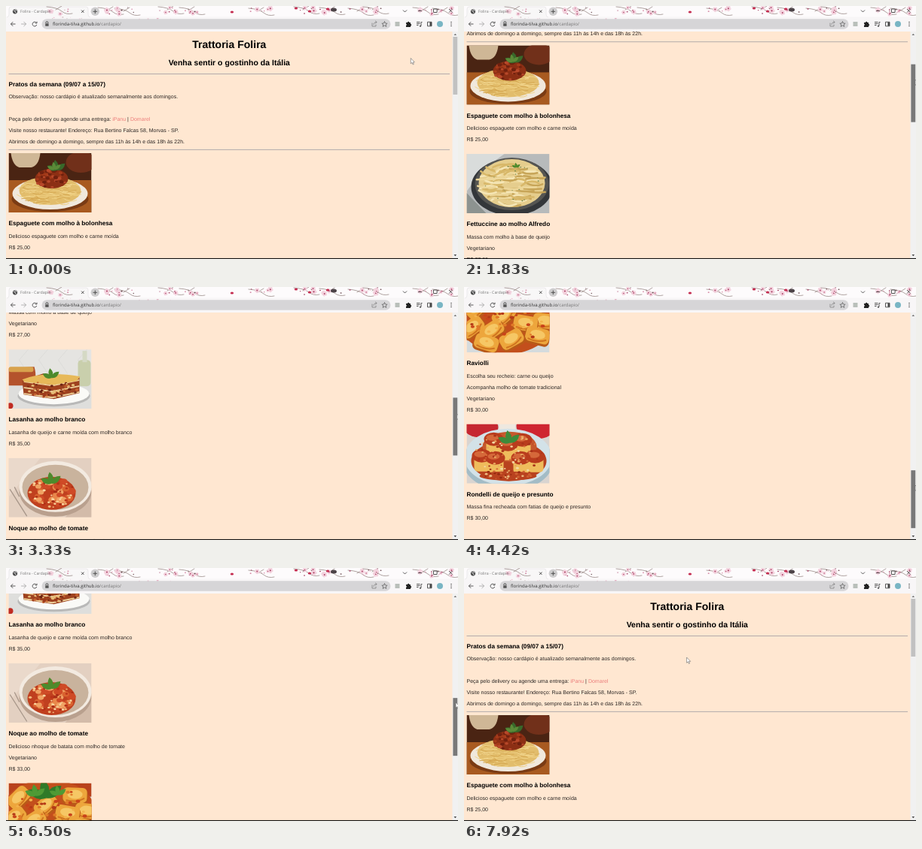
An HTML page for the animation above (8 s loop, 600 by 337 pixels).

```html
<!DOCTYPE html>
<html lang="pt-BR">
<head>
<meta charset="utf-8">
<title>Cardapio</title>
<style>
html, body { margin: 0; width: 100%; height: 100%; overflow: hidden; background: #ffe7d1; }
svg { display: block; }
#stage { width: 100vw; height: 100vh; }
text { font-family: "Liberation Sans", Arial, sans-serif; text-rendering: geometricPrecision; white-space: pre; }
.ui { font-family: "Open Sans", sans-serif; }
.line { fill: none; stroke: #444; stroke-width: .9; }
.link { fill: #ec7f7c; }
</style>
</head>
<body>
<svg id="stage" viewBox="0 0 600 337" preserveAspectRatio="none"></svg>
<script>
let seed = 11;
const rnd = () => (seed = seed * 16807 % 2147483647) / 2147483647;
const pick = list => list[Math.floor(rnd() * list.length)];
const times = (n, fn) => Array.from({ length: n }, (_, i) => fn(i)).join('');

const rect = (x, y, w, h, fill, more = '') =>
  `<rect x="${x}" y="${y}" width="${w}" height="${h}" fill="${fill}" ${more}/>`;
const oval = (x, y, rx, ry, fill, more = '') =>
  `<ellipse cx="${x}" cy="${y}" rx="${rx}" ry="${ry}" fill="${fill}" ${more}/>`;
const path = (d, fill, more = '') => `<path d="${d}" fill="${fill}" ${more}/>`;
const stroke = (d, color, width = .8) =>
  path(d, 'none', `stroke="${color}" stroke-width="${width}" stroke-linecap="round"`);
const text = (x, y, size, str, more = '') =>
  `<text x="${x}" y="${y + size * .358}" font-size="${size}" ${more}>${str}</text>`;

// A random point inside an ellipse
function inside(x, y, rx, ry) {
  const a = rnd() * 6.283, r = Math.sqrt(rnd());
  return [x + Math.cos(a) * r * rx, y + Math.sin(a) * r * ry];
}
const blobs = (n, area, size, colors) => times(n, () => {
  const [x, y] = inside(...area), r = size * (.6 + rnd() * .6);
  return oval(x, y, r, r * .75, pick(colors));
});
const strands = (n, area, len, colors, width) => times(n, () => {
  const [x, y] = inside(...area), bend = (rnd() - .5) * len;
  return stroke(`M${x - len / 2} ${y}q${len / 2} ${bend} ${len} ${bend / 3}`, pick(colors), width);
});
const leaves = (x, y, size, color = '#4d8a2c') => [-65, -10, 50].map(a =>
  `<g transform="translate(${x} ${y}) rotate(${a})">` +
  path(`M0 0Q${-size * .6} ${-size * .6} 0 ${-size * 1.3}Q${size * .6} ${-size * .6} 0 0`, color) + '</g>').join('');

const photos = [
  // spaghetti
  () => rect(0, 0, 110, 79, '#4a2413') + rect(0, 36, 110, 43, '#a85a20') +
    path('M3 0H42Q40 17 30 19H14Q5 16 3 0', '#cfb796') + oval(96, 12, 20, 14, '#71301a') +
    oval(55, 61, 51, 17, '#7a3b14') + oval(55, 54, 50, 21, '#f0e8dc') +
    oval(55, 50, 41, 19, '#e2bd6c') +
    strands(70, [55, 52, 37, 16], 17, ['#f2d68e', '#d5a750', '#efcf80'], 1) +
    oval(57, 34, 22, 13, '#8c2f14') + blobs(45, [57, 34, 21, 12], 2.6, ['#6f200e', '#a63b1a', '#b8482a']) +
    leaves(64, 23, 11, '#38682a') + leaves(61, 22, 8, '#5b8a38'),
  // fettuccine
  () => rect(0, 0, 110, 79, '#b7babb') + path('M0 0H50L20 22L0 50', '#d9dcdb') +
    path('M0 52L26 79H0', '#8d9390') + oval(60, 44, 54, 38, '#34373a') + oval(60, 40, 49, 35, '#555552') +
    oval(60, 39, 44, 32, '#e5cd8d') +
    strands(75, [60, 39, 37, 28], 23, ['#f5e6b6', '#d8b869', '#edd79a', '#c7a558'], 2.5) +
    blobs(22, [60, 38, 38, 27], 1, ['#658044', '#87935a']) + leaves(66, 18, 5),
  // lasagna
  () => rect(0, 0, 110, 79, '#e5e4e1') +
    times(5, i => stroke(`M${i * 26} 0l-12 14 12 18`, '#d5d5d2', .6)) + rect(0, 46, 110, 33, '#dededc') +
    rect(92, 14, 17, 35, '#c9cfac', 'rx="5"') + rect(98, 2, 6, 15, '#d5d9c5') +
    path('M0 25L34 23Q39 40 30 48H0', '#b4532c') + rect(0, 23, 33, 7, '#d8a24d', 'rx="3"') +
    oval(2, 75, 4, 4, '#c02b22') +
    oval(60, 62, 48, 14, '#b9b9b8') + oval(60, 59, 47, 14, '#fafaf7') +
    path('M18 41L46 32L94 37L94 58L60 66L20 60', '#9e421f') +
    [43, 51, 59].map(y => stroke(`M21 ${y}l37 5 35 -7`, '#edd09a', 2)).join('') +
    path('M18 40Q48 28 95 36L90 42L59 47L21 43', '#e7b959') +
    blobs(70, [57, 53, 36, 11], 1.9, ['#6d2413', '#9c3a1b', '#c76431', '#e7bd78']) + leaves(57, 38, 10),
  // gnocchi
  () => rect(0, 0, 110, 79, '#e3d0c1') + path('M0 0H42L0 52', '#ead9cb') + path('M75 79L110 43V79', '#d3bba9') +
    oval(62, 44, 48, 34, '#b9a08e') + oval(62, 38, 48, 34, '#f3eae0') + oval(62, 39, 44, 30, '#c9b39d') +
    oval(57, 47, 32, 22, '#c0401f') +
    blobs(30, [57, 46, 28, 19], 5.5, ['#e8874a', '#cf4a26', '#f0a263', '#d9632f']) +
    blobs(45, [57, 46, 30, 20], 1.9, ['#f9d39c', '#a82c15', '#f2b87a', '#bb3218']) + leaves(57, 34, 12) +
    stroke('M2 42L24 77M8 39L14 51', '#a9988b', 1.4),
  // ravioli
  () => rect(0, 0, 110, 79, '#d5dbdd') + rect(0, 0, 110, 18, '#b9421c') + oval(53, 38, 62, 43, '#c34f1c') +
    [[14, 20], [88, 17], [50, 30], [104, 38], [8, 46], [78, 41], [34, 50], [94, 57], [60, 62], [26, 67]].map(([x, y], i) =>
      `<g transform="translate(${x} ${y}) rotate(${i * 47 % 90 - 45})">` +
      rect(-17, -10, 34, 22, '#b95a18', 'rx="6"') + rect(-16, -11, 32, 20, '#eda63c', 'rx="6"') +
      oval(0, -2, 10, 6, '#f6c765') + stroke('M-11 6Q2 9 12 3', '#d0741f', 2) + '</g>').join('') +
    blobs(45, [53, 38, 52, 34], 2.4, ['#c9431a', '#e07a28', '#b53a17', '#f3b24c']) +
    leaves(50, 20, 20, '#2f7a28') + leaves(36, 17, 12, '#4f9a35') + leaves(66, 16, 10, '#4f9a35'),
  // rondelli
  () => rect(0, 0, 110, 79, '#d9d4d0') + oval(19, 4, 23, 14, '#c62730') + oval(92, 3, 26, 17, '#cf2530') +
    rect(43, 0, 22, 12, '#eee8df') + oval(55, 49, 60, 40, '#a3bcc6') + oval(55, 44, 58, 38, '#d3e2e8') +
    oval(56, 49, 50, 27, '#b8421f') + oval(57, 30, 36, 20, '#c6582c') +
    [[36, 20], [74, 21], [55, 27], [20, 42], [91, 43], [38, 45], [72, 45]].map(([x, y]) =>
      rect(x - 10, y - 1, 21, 22, '#efbc5c', 'rx="5"') + oval(x, y, 13, 9, '#b93c1d') +
      oval(x - 2, y - 2, 8, 4, '#d5683a')).join('') +
    blobs(85, [56, 40, 44, 27], 1.7, ['#f3d9a4', '#d86e3a', '#a93319', '#e9a860']) +
    oval(55, 69, 38, 6, '#b9421f') + blobs(30, [53, 68, 36, 6], 1.7, ['#edbd82', '#cf6131', '#96290f']) +
    leaves(57, 25, 13, '#3f8a3a')
];

const dishes = [
  ['Espaguete com molho à bolonhesa', 'Delicioso espaguete com molho e carne moída', 'R$ 25,00'],
  ['Fettuccine ao molho Alfredo', 'Massa com molho à base de queijo', 'Vegetariano', 'R$ 27,00'],
  ['Lasanha ao molho branco', 'Lasanha de queijo e carne moída com molho branco', 'R$ 35,00'],
  ['Noque ao molho de tomate', 'Delicioso nhoque de batata com molho de tomate', 'Vegetariano', 'R$ 33,00'],
  ['Raviolli', 'Escolha seu recheio: carne ou queijo', 'Acompanha molho de tomate tradicional', 'Vegetariano', 'R$ 30,00'],
  ['Rondelli de queijo e presunto', 'Massa fina recheada com fatias de queijo e presunto', 'R$ 30,00']
];

const LEFT = 3.5, STEP = 14.9;
const para = (y, str) => text(LEFT, y, 7.02, str, 'fill="#2b2724"');
const title = (y, size, str) => text(296.3, y, size, str, 'font-weight="bold" text-anchor="middle"');
const sub = (y, str) => text(LEFT, y, 8.22, str, 'font-weight="bold"');
const link = str => `<tspan class="link">${str}</tspan>`;
const rule = y => rect(LEFT, y - .4, 585.5, .9, '#aaa5a7');

function menu() {
  let y = 196;
  return dishes.map(([name, ...lines], i) => {
    const top = y;
    y += 110.5 + STEP * (lines.length - 1) + 19.3;
    return `<svg x="${LEFT}" y="${top}" width="110" height="79">${photos[i]()}</svg>` +
      sub(top + 93.2, name) + lines.map((l, k) => para(top + 110.3 + k * STEP, l)).join('');
  }).join('');
}

const page = () =>
  title(51, 14.04, 'Trattoria Folira') + title(75, 10.53, 'Venha sentir o gostinho da Itália') +
  rule(90.5) + sub(104, 'Pratos da semana (09/07 a 15/07)') +
  para(120.5, 'Observação: nosso cardápio é atualizado semanalmente aos domingos.') +
  para(150.3, `Peça pelo delivery ou agende uma entrega: ${link('iPanu')} | ${link('Domarel')}`) +
  para(165.2, 'Visite nosso restaurante! Endereço: Rua Bertino Falcas 58, Morvas - SP.') +
  para(180.1, 'Abrimos de domingo a domingo, sempre das 11h às 14h e das 18h às 22h.') +
  rule(191.3) + menu() +
  para(1142.3, 'Dúvidas? Sugestões? Entre em contato!') +
  para(1157.2, `${link('PapoNuvo')} | ${link('Turmanex')} | ${link('Retratano')}`);

const flower = (x, y, r) => times(5, i => {
  const a = i * 1.257 + x;
  return oval(x + Math.cos(a) * r, y + Math.sin(a) * r, r * .8, r * .8, '#f3d3de');
}) + oval(x, y, r * .5, r * .5, '#b0486c');

// Sprigs of cherry blossom: a twig, pale flowers, buds and a few dark petals
const blossoms = () => [70, 138, 160, 218, 246, 338, 398, 432, 470, 490, 556, 582].map((x, i) =>
  stroke(`M${x - 16} ${1 + i % 3}q14 1 20 6t14 3m-22 -5l8 -5`, '#8d7b78', .7) +
  times(3, () => flower(x + rnd() * 26 - 13, 2 + rnd() * 9, 1.3 + rnd())) +
  blobs(4, [x, 6, 16, 5], 1, ['#6b4a50', '#d58aa5', '#a8476a'])).join('') +
  [[300, 8], [385, 3], [403, 7], [427, 4]].map(([x, y]) => oval(x, y, 2.2, 1.6, '#c42c50')).join('') +
  oval(435, 5, 4, 2.5, '#4d4448') +
  blobs(16, [200, 18, 24, 5], 1, ['#edc3d3', '#e3a9bf']) + blobs(16, [80, 18, 25, 4], .9, ['#c9b5b5', '#edc3d3']);

const line = d => `<path class="line" d="${d}"/>`;
const chrome = () =>
  rect(0, 0, 600, 15, '#fdfbfc') + rect(0, 14.5, 600, 19.5, '#f8f6f7') +
  path('M1 15Q4 15 4 11V4Q4 1 7 1H106Q109 1 109 4V11Q109 15 112 15', '#f8f7f7', 'stroke="#dddadd" stroke-width=".5"') +
  blossoms() +
  oval(12, 7.3, 3.1, 3.1, '#4b4b4b') + stroke('M10 6l2 1 1 2M12 5l2 1', '#fff', .8) +
  text(19, 7.3, 5.3, 'Folira - Cardapio', 'class="ui" fill="#777"') +
  line('M100 5.5l3.5 3.5m0-3.5l-3.5 3.5') +
  oval(118.3, 7.3, 5.7, 5.7, '#cecdce') + line('M115.5 7.3h5.6m-2.8-2.8v5.6') +
  line('M527 5.5l2.5 2.5 2.5-2.5M547 6.5h5M567.5 4h4.6v4.6h-4.6zM588 4l4.6 4.6m0-4.6l-4.6 4.6') +
  rect(47.5, 17.2, 463, 13.6, '#d6d5d7', 'rx="6.8"') +
  line('M12.5 24H6.5m2.7-2.8L6.4 24l2.8 2.8') +
  stroke('M20.5 24h6m-2.7-2.8l2.8 2.8-2.8 2.8', '#aaa', .9) +
  line('M40.4 22.4a2.9 2.9 0 1 0 .4 2.6M41 20.7v2.2h-2.3') +
  rect(52.2, 23.2, 4.4, 3.5, '#555', 'rx=".5"') + line('M53 23v-1a1.4 1.4 0 0 1 2.8 0v1') +
  text(62, 24.1, 6.05, 'florinda-tilva.github.io<tspan fill="#777">/cardapio/</tspan>', 'class="ui" fill="#333"') +
  stroke('M486 23v4h5v-2m-3-.5q0-3 4-3m-1.5-1.5l1.6 1.5-1.6 1.5', '#777', .7) +
  path('M502.5 20.5l1 2.5 2.6 .2-2 1.7 .7 2.5-2.3-1.4-2.3 1.4 .7-2.5-2-1.7 2.6-.2z', 'none', 'stroke="#555" stroke-width=".7"') +
  rect(516.5, 21, 6, 6, '#b9bfba') +
  path('M531 22h2a1.2 1.2 0 0 1 2.4 0h1.6v2a1.2 1.2 0 0 1 0 2.4v1.6h-6v-2a1.3 1.3 0 0 0 0-2.4z', '#222') +
  line('M545 21.5h4.5m-4.5 2h4.5m-4.5 2h2.5m3.5 1v-5h1.5') + oval(550, 26.7, 1.1, 1, '#444') +
  line('M559.5 21.3h5.5v5.5h-5.5z') + rect(562.5, 21.5, 2.5, 5, '#444') +
  oval(576, 24, 4, 4, '#79b5c4') +
  [21.5, 24, 26.5].map(y => oval(591, y, .75, .75, '#444')).join('');

const stage = document.getElementById('stage');
stage.innerHTML =
  rect(0, 0, 600, 337, '#ffe7d1') +
  `<svg y="34" width="600" height="302" viewBox="0 34 600 302"><g id="page">${page()}</g></svg>` +
  chrome() +
  rect(592.5, 34, 7.5, 302, '#f1f1f1') +
  path('M594.5 39l1.8-2.2 1.8 2.2z', '#777') + path('M594.5 331l1.8 2.2 1.8-2.2z', '#444') +
  rect(593.4, 41, 5.8, 77, '#c1c1c1', 'id="thumb"') +
  rect(0, 335.9, 600, 1.1, '#151515') +
  path('M0 0V7.3L1.7 5.8L2.9 8.5L4 8L2.9 5.4H5.1Z', '#fff', 'id="cursor" stroke="#666" stroke-width=".6"');

// Each key: time, then values
const scrollKeys = [[0, 0], [900, 0], [1830, 143], [3330, 416], [4416, 796.4], [4920, 829], [5960, 829], [6500, 518], [7640, 0]];
const cursorKeys = [[0, 537.3, 69.5], [250, 545, 70], [800, 598.5, 63], [900, 599, 62], [1830, 599, 98],
  [3330, 598.8, 169], [4416, 599, 264], [5000, 599, 286], [5900, 598, 265], [6500, 597, 179],
  [7640, 597, 62], [7720, 590, 66], [7910, 295.6, 119]];

function at(keys, t) {
  const i = keys.findIndex(k => k[0] > t);
  if (i < 0) return keys[keys.length - 1].slice(1);
  const a = keys[i - 1], b = keys[i], f = (t - a[0]) / (b[0] - a[0]);
  return a.slice(1).map((v, k) => v + (b[k + 1] - v) * f);
}

const [pageEl, thumb, cursor] = ['page', 'thumb', 'cursor'].map(id => document.getElementById(id));
const TICK = 1000 / 12;

function draw(now) {
  const t = Math.floor((now % 8000 + 4) / TICK) * TICK;
  const [scroll] = at(scrollKeys, t), [x, y] = at(cursorKeys, t);
  pageEl.setAttribute('transform', `translate(0 ${-scroll})`);
  thumb.setAttribute('y', 41 + scroll / 3.92);
  thumb.setAttribute('fill', t > 860 && t < 7680 ? '#787878' : '#c1c1c1');
  cursor.setAttribute('transform', `translate(${x} ${y})`);
  requestAnimationFrame(draw);
}
draw(0);
</script>
</body>
</html>
```
